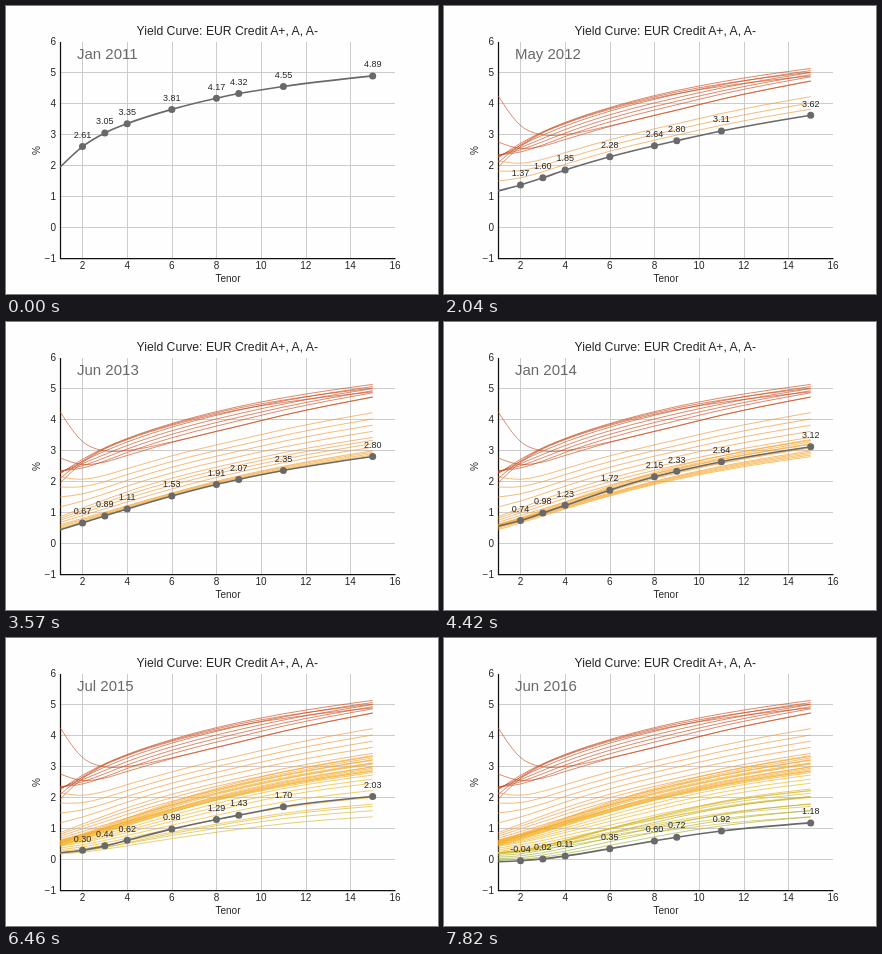
Recreate the animation shown at these times as an HTML page. Size 432 px wide and 288 px high, loop 7990 ms.

```html
<!DOCTYPE html>
<html lang="en">
<head>
<meta charset="utf-8">
<title>Yield curve</title>
<style>
  html, body { margin: 0; width: 100%; height: 100%; overflow: hidden; background: #fefefe; }
  svg { display: block; width: 432px; height: 288px; font-family: "Liberation Sans", Arial, sans-serif; fill: #262626; }
  path { fill: none; }
  .grid { stroke: #ccc; stroke-width: 1; }
  .axis { stroke: #111; stroke-width: 1.25; }
  .title { font-size: 12.2px; }
  .tick { font-size: 10px; }
  .mid { text-anchor: middle; }
  .end { text-anchor: end; }
  .trail { stroke-width: .65; }
  .now { stroke: #696969; stroke-width: 1.6; }
  .dot { fill: #696969; }
  .value { font-size: 9px; text-anchor: middle; }
  .date { font-size: 15px; fill: #696969; }
</style>
</head>
<body>
<svg viewBox="0 0 432 288">
  <g id="frame"></g>
  <g id="trails"></g>
  <g id="current"></g>
</svg>
<script>
const STEP_MS = 170, STEPS = 47, FIRST_YEAR = 2011;
const TENORS = [1, 2, 3, 4, 6, 8, 9, 11, 15];
const MONTHS = 'Jan Feb Mar Apr May Jun Jul Aug Sep Oct Nov Dec'.split(' ');
const YEAR_COLORS = ['#cb4c1c', '#ef9836', '#f8a31c', '#f2b41a', '#d6b92c', '#a4b036'];

// Key curves: step, month, then the yield at each tenor.
const CURVES = [
  [0, 0, 1.95, 2.61, 3.05, 3.35, 3.81, 4.17, 4.32, 4.55, 4.89],
  [7, 9, 2.76, 2.55, 2.63, 2.84, 3.26, 3.62, 3.79, 4.14, 4.72],
  [17, 23, .61, .81, 1.01, 1.22, 1.63, 2.01, 2.18, 2.49, 2.99],
  [26, 36, .56, .74, .98, 1.23, 1.72, 2.15, 2.33, 2.64, 3.12],
  [31, 42, .43, .55, .70, .87, 1.23, 1.58, 1.75, 2.05, 2.46],
  [38, 54, .22, .30, .44, .62, .98, 1.29, 1.43, 1.70, 2.03],
  [46, 65, -.07, -.04, .02, .11, .35, .60, .72, .92, 1.18]
];

// Market swings between them: step, scale of the curve, bump at the short end.
const SWINGS = [
  [2, 1.06, -.06], [6, 1.025, -.36], [8, 1.04, 1.6], [9, .965, -.1], [13, .93, -.5],
  [21, .92, -.1], [23, 1.09, 0], [36, .64, 0], [41, 1.33, .05],
  ...CURVES.map(([step]) => [step, 1, 0])
].sort((a, b) => a[0] - b[0]);

const px = tenor => 54.2 + (tenor - 1) * 22.32;
const py = value => 221.5 - value * 31;
const lerp = (a, b, t) => a + (b - a) * t;

// Linear blend of the rows on both sides of a step, without the step column.
function blend(rows, step) {
  const next = Math.max(1, rows.findIndex(row => row[0] >= step));
  const from = rows[next - 1], to = rows[next];
  const t = (step - from[0]) / (to[0] - from[0]);
  return from.map((v, i) => lerp(v, to[i], t)).slice(1);
}

function stateAt(step) {
  const [month, ...yields] = blend(CURVES, step);
  const [scale, bump] = blend(SWINGS, step);
  return {
    month: Math.round(month),
    yields: yields.map((v, i) => v * scale + bump * Math.exp((1 - TENORS[i]) / 1.5))
  };
}

// Cubic Hermite curve through the points, with parabolic ends.
function pathOf(yields) {
  const pts = yields.map((v, i) => [px(TENORS[i]), py(v)]);
  const last = pts.length - 1;
  const secant = i => (pts[i + 1][1] - pts[i][1]) / (pts[i + 1][0] - pts[i][0]);
  const slope = i => {
    if (i === 0) return 1.5 * secant(0) - .5 * slope(1);
    if (i === last) return 1.5 * secant(last - 1) - .5 * slope(last - 1);
    const before = pts[i][0] - pts[i - 1][0], after = pts[i + 1][0] - pts[i][0];
    return (secant(i - 1) * after + secant(i) * before) / (before + after);
  };
  let d = 'M' + pts[0];
  for (let i = 1; i <= last; i++) {
    const [x0, y0] = pts[i - 1], [x1, y1] = pts[i], h = (x1 - x0) / 3;
    d += `C${x0 + h},${y0 + slope(i - 1) * h} ${x1 - h},${y1 - slope(i) * h} ${x1},${y1}`;
  }
  return d;
}

function add(parent, tag, attrs, text) {
  const el = document.createElementNS('http://www.w3.org/2000/svg', tag);
  for (const name in attrs) el.setAttribute(name, attrs[name]);
  if (text !== undefined) el.textContent = text;
  return parent.appendChild(el);
}

const frame = document.getElementById('frame');
for (let t = 2; t <= 16; t += 2) {
  const x = Math.round(px(t) - .1) + .5;
  if (t < 16) add(frame, 'path', { class: 'grid', d: `M${x} 36V252` });
  add(frame, 'text', { class: 'tick mid', x: px(t), y: 263 }, t);
}
for (let v = -1; v <= 6; v++) {
  if (v > -1 && v < 6) add(frame, 'path', { class: 'grid', d: `M54 ${py(v)}H389` });
  add(frame, 'text', { class: 'tick end', x: 50, y: py(v) + 3.3 }, v < 0 ? '\u2212' + -v : v);
}
add(frame, 'path', { class: 'axis', d: 'M54.5 36V252.5H389.5' });
add(frame, 'text', { class: 'title mid', x: 221.3, y: 29 }, 'Yield Curve: EUR Credit A+, A, A-');
add(frame, 'text', { class: 'tick mid', x: 222, y: 276 }, 'Tenor');
add(frame, 'text', { class: 'tick mid', transform: 'translate(33.5 144.5) rotate(-90)' }, '%');

const states = Array.from({ length: STEPS }, (_, step) => stateAt(step));
const trailLayer = document.getElementById('trails');
const trails = states.map(({ month, yields }) => add(trailLayer, 'path', {
  class: 'trail', d: pathOf(yields), stroke: YEAR_COLORS[Math.floor(month / 12)]
}));

const current = document.getElementById('current');
const line = add(current, 'path', { class: 'now' });
const points = TENORS.slice(1).map(t => ({
  dot: add(current, 'circle', { class: 'dot', cx: px(t), r: 3.5 }),
  label: add(current, 'text', { class: 'value', x: px(t) })
}));
const date = add(current, 'text', { class: 'date', x: 71, y: 53 });

function show(step) {
  const { month, yields } = states[step];
  trails.forEach((trail, i) => trail.setAttribute('visibility', i < step ? 'visible' : 'hidden'));
  line.setAttribute('d', pathOf(yields));
  points.forEach(({ dot, label }, i) => {
    const value = yields[i + 1], y = py(value);
    dot.setAttribute('cy', y);
    label.setAttribute('y', y - 8.7);
    label.textContent = value.toFixed(2);
  });
  date.textContent = `${MONTHS[month % 12]} ${FIRST_YEAR + Math.floor(month / 12)}`;
}

let shown = 0;
const start = performance.now();
function tick() {
  const step = Math.floor((performance.now() - start) / STEP_MS) % STEPS;
  if (step !== shown) show(shown = step);
  requestAnimationFrame(tick);
}
show(0);
requestAnimationFrame(tick);
</script>
</body>
</html>
```
